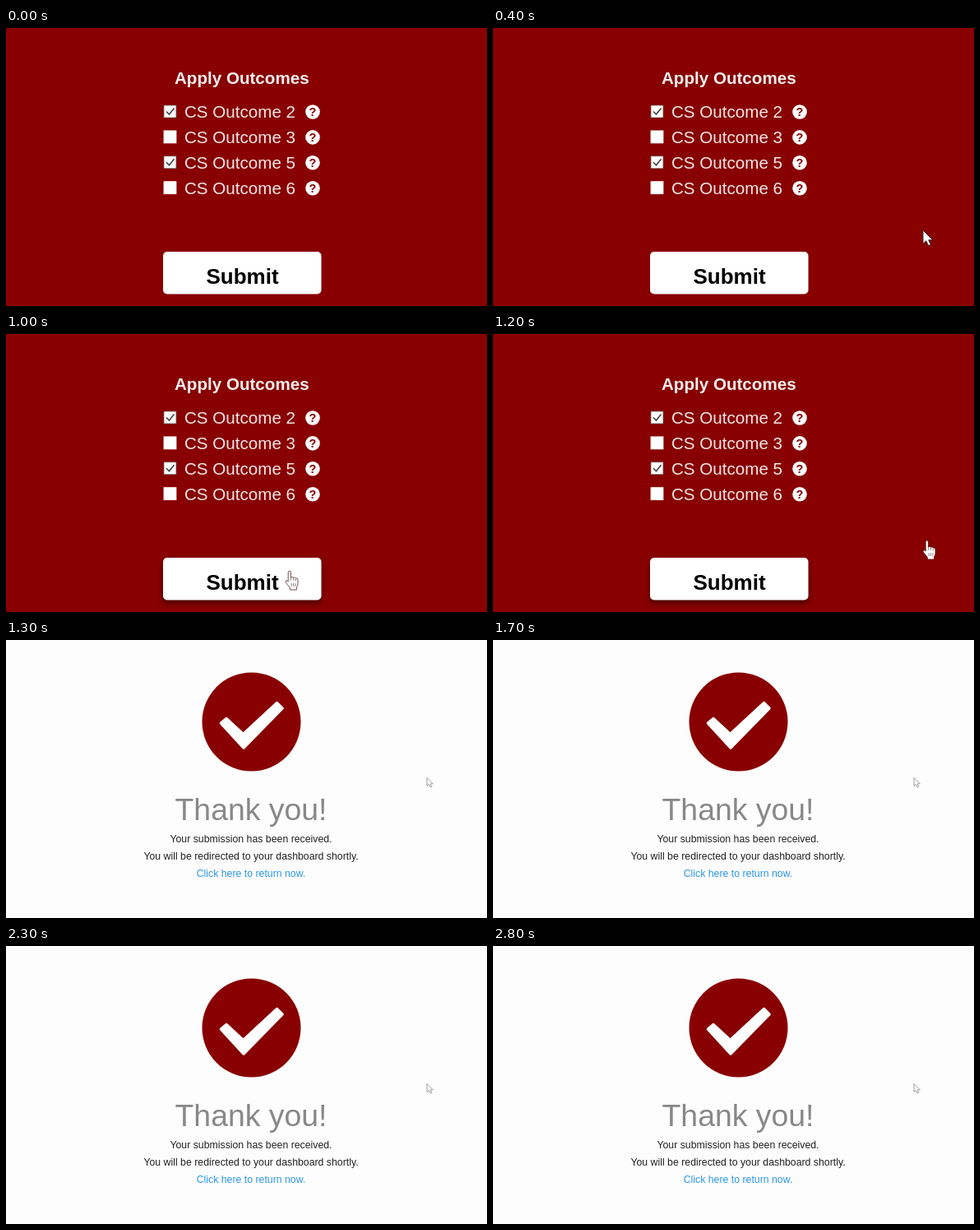
Animation, 585 px wide and 338 px high, one loop 2.9 s. Source, as an HTML page:

```html
<!DOCTYPE html>
<html lang="en">
<head>
<meta charset="utf-8">
<style>
  html, body { margin: 0; width: 100%; height: 100%; overflow: hidden; background: #800; }
  svg { display: block; width: 585px; height: 338px; font-family: "Liberation Sans", Arial, sans-serif; }
  .bold { font-weight: bold; }
  .center { text-anchor: middle; }
  #button.hover { filter: drop-shadow(0 4px 3px rgba(0, 0, 0, .45)); }
</style>
</head>
<body>
<svg viewBox="0 0 585 338">
  <defs>
    <path id="arrow" d="M0 0V16.2L3.8 12.8L6.6 18.6L9.4 17.3L6.7 11.8H11.7Z" fill="#fff" stroke="#333" stroke-linejoin="round"/>
    <g id="hand" stroke-linejoin="round">
      <path d="M3.2 1.8Q3.2 0 4.8 0Q6.4 0 6.4 1.8V8Q8.2 6.8 9.6 8.2Q11.4 7.4 12.4 9Q15 8.4 15 11V16Q15 18 13.4 20V23H5.4V20.5L.5 14.5Q-.5 12.6 1 11.8Q2.2 11.5 3.2 13Z" fill="#fff" stroke="#400" stroke-width=".7"/>
      <path d="M6.4 8V12M9.5 8.6V12M12.3 9.4V12.5M7.2 15V19M9.6 15V19M12 15V19" fill="none" stroke="#655" stroke-width=".7"/>
    </g>
  </defs>

  <g id="form">
    <rect width="585" height="338" fill="#800"/>
    <text class="bold center" x="286.8" y="68" font-size="20.6" fill="#f6eeee">Apply Outcomes</text>
    <g id="options"></g>
    <rect id="button" x="191" y="272" width="192.5" height="51.5" rx="5" fill="#fff"/>
    <text class="bold center" x="287.5" y="311" font-size="26">Submit</text>
  </g>

  <g id="thanks" class="center">
    <rect width="585" height="338" fill="#fdfdfd"/>
    <circle cx="298.5" cy="99.5" r="60" fill="#800"/>
    <path d="M261.5 101L268 95.5L288.5 114.5L329.5 76.5L336 83L289 131Z" fill="#fff" stroke="#fff" stroke-width="3.5" stroke-linejoin="round"/>
    <text x="298" y="219" font-size="37.4" fill="#888">Thank you!</text>
    <g font-size="12.3" fill="#222">
      <text x="298" y="246">Your submission has been received.</text>
      <text x="298" y="267">You will be redirected to your dashboard shortly.</text>
      <text x="298" y="288" fill="#2b95e9">Click here to return now.</text>
    </g>
  </g>

  <use id="cursor"/>
</svg>
<script>
  const LOOP = 2900, STEP = 100, SUBMITTED = 1300;
  const $ = id => document.getElementById(id);

  $('options').innerHTML = [2, 3, 5, 6].map((number, row) => {
    const checked = number === 2 || number === 5;
    const tick = '<path d="M195 101.5L198.5 105L204.5 97.5" fill="none" stroke="#444" stroke-width="1.6"/>';
    return `<g transform="translate(0 ${row * 30.9})">
      <rect x="192" y="94" width="15" height="15" fill="#fff" stroke="${checked ? '#655' : '#fff'}" stroke-width=".8"/>
      ${checked ? tick : ''}
      <text x="217" y="109" font-size="20.6" fill="#f3e6e6">CS Outcome ${number}</text>
      <circle cx="373" cy="102" r="8.8" fill="#fff"/>
      <text class="bold center" x="373" y="107.2" font-size="14.5" fill="#800">?</text>
    </g>`;
  }).join('');

  // Pointer path: time, x, y
  const path = [[400, 523, 246], [700, 365, 270], [900, 340, 288], [1000, 340, 288], [1200, 523, 251]];

  function pointerAt(time) {
    const next = Math.max(1, path.findIndex(point => point[0] >= time));
    const [t0, x0, y0] = path[next - 1], [t1, x1, y1] = path[next];
    const k = (time - t0) / (t1 - t0);
    return [x0 + (x1 - x0) * k, y0 + (y1 - y0) * k];
  }

  function draw(now) {
    const time = Math.floor(now % LOOP / STEP) * STEP;
    const submitted = time >= SUBMITTED;
    const hover = time > 700 && !submitted;
    const visible = time >= path[0][0];
    $('form').style.display = submitted ? 'none' : '';
    $('thanks').style.display = submitted ? '' : 'none';
    $('button').classList.toggle('hover', hover);

    const cursor = $('cursor');
    cursor.style.display = visible ? '' : 'none';
    if (visible) {
      const [x, y] = submitted ? [512, 167.5] : pointerAt(time);
      cursor.setAttribute('href', hover ? '#hand' : '#arrow');
      cursor.setAttribute('transform', `translate(${x} ${y}) scale(${submitted ? 0.62 : 1})`);
      cursor.setAttribute('opacity', submitted ? 0.75 : 1);
    }
    requestAnimationFrame(draw);
  }
  requestAnimationFrame(draw);
</script>
</body>
</html>
```
